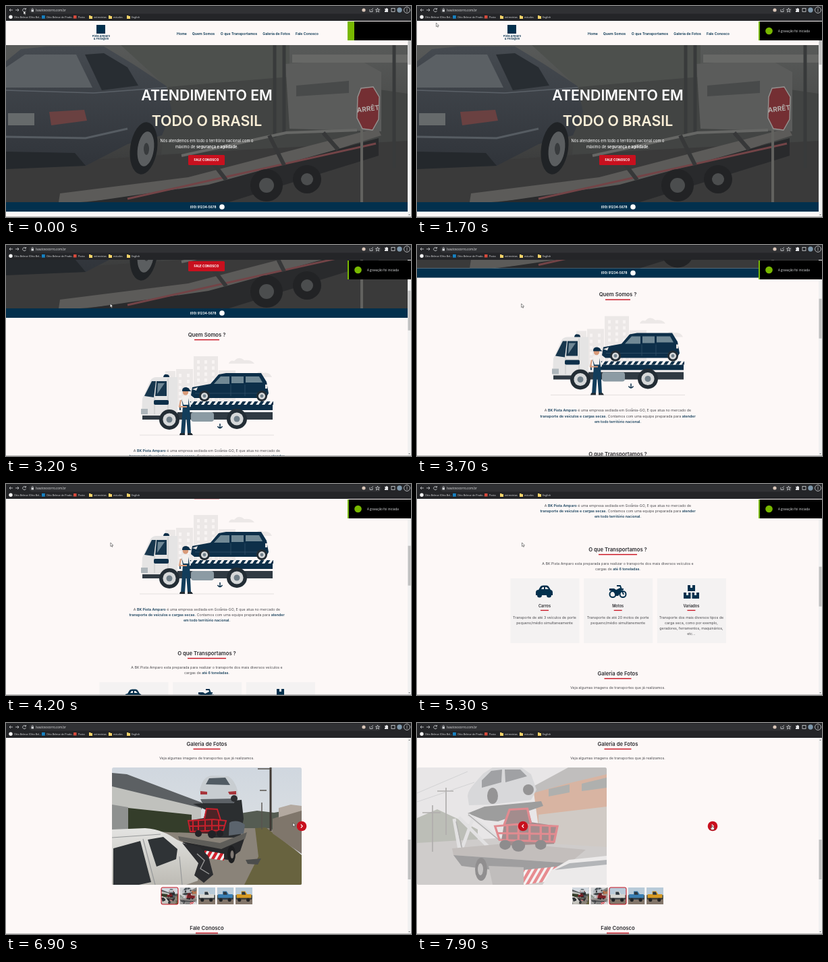
Animation, 600 px wide and 313 px high, one loop 8000 ms. Source, as an HTML page:

```html
<!DOCTYPE html>
<html lang="pt-BR">
<head>
<meta charset="utf-8">
<title>Pista Amparo</title>
<style>
  html, body { margin: 0; width: 100%; height: 100%; overflow: hidden; background: #fdf8f7; }
  svg { display: block; }
  #stage { width: 100vw; height: 100vh; }
  text { font-family: Inter, "Open Sans", sans-serif; font-size: 5.3px; fill: #4b4b4f; }
  .mid text { text-anchor: middle; }
  .nav text { font-weight: 600; font-size: 5.2px; fill: #02304d; }
  .nav .logo { font-size: 4.1px; }
  .hero text { font-weight: 600; font-size: 21.3px; fill: #fff; }
  .hero .lead { font-weight: 400; font-size: 5.7px; }
  .hero .btn { font-weight: 700; font-size: 4.7px; }
  .body .title { font-weight: 600; font-size: 7.7px; fill: #2c2c30; }
  .body .name { font-weight: 600; font-size: 5.6px; fill: #2c2c30; }
  .chrome text { font-family: "Open Sans", sans-serif; font-size: 4.5px; fill: #e4e5e7; }
  .chrome .marks text { font-size: 3.7px; }
  tspan { font-weight: 600; }
  .body tspan { fill: #17405c; }
  .red { fill: #c8101e; }
  .navy { fill: #02304d; }
  .line { fill: none; stroke: #d5d7da; stroke-width: .8; }
  .chevron { fill: none; stroke: #fff; stroke-width: 1.1; }
</style>
</head>
<body>
<svg id="stage" viewBox="0 0 600 313" preserveAspectRatio="none">
<defs>
  <linearGradient id="haze" x2="0" y2="1">
    <stop stop-color="#585a59"/><stop offset=".5" stop-color="#474847"/><stop offset="1" stop-color="#303132"/>
  </linearGradient>
  <linearGradient id="paint" x2="0" y2="1">
    <stop stop-color="#454a50"/><stop offset="1" stop-color="#30343a"/>
  </linearGradient>
  <linearGradient id="sky" x2="0" y2="1">
    <stop stop-color="#d0d7df"/><stop offset="1" stop-color="#e3e5e5"/>
  </linearGradient>
  <linearGradient id="shell" x2="0" y2="1">
    <stop stop-color="#e4e4e2"/><stop offset="1" stop-color="#bdbbb4"/>
  </linearGradient>
  <pattern id="hatch" width="9" height="6" patternUnits="userSpaceOnUse" patternTransform="skewX(-35)">
    <rect width="9" height="6" fill="#f3f1f0"/><rect width="5" height="6" fill="#0d2f49"/>
  </pattern>
  <pattern id="warn" width="9" height="14" patternUnits="userSpaceOnUse" patternTransform="skewX(-30)">
    <rect width="9" height="14" fill="#eee"/><rect width="5" height="14" fill="#d3222c"/>
  </pattern>
  <clipPath id="frame"><rect width="281" height="174" rx="2.5"/></clipPath>
  <clipPath id="heroBox"><rect y="58" width="595" height="233"/></clipPath>

  <g id="trike">
    <path d="M9 16 14 1 30 0 34 14 57 18 54 36 6 38Z" fill="#4c2326"/>
    <path d="M9 17 14 1 30 0 33 15M1 18 20 16 57 18 54 34 5 32ZM3 25 56 26M12 17V33M22 16V33M32 16V34M42 17V34M50 18V34" fill="none" stroke="#c7202c" stroke-width="2"/>
    <g fill="#222226"><circle cx="10" cy="37" r="5"/><circle cx="22" cy="38" r="6"/><circle cx="42" cy="37" r="5"/></g>
  </g>

  <g id="photo0" clip-path="url(#frame)">
    <rect width="281" height="174" fill="url(#sky)"/>
    <path d="M190 68 215 64 240 67 281 60V110H185Z" fill="#555c52"/>
    <path d="M0 98 130 90 235 90 281 130V174H0Z" fill="#8a8379"/>
    <path d="M0 8 22 10 133 52V62L0 30Z" fill="#5c6063"/>
    <path d="M0 28 132 60V96L0 96Z" fill="#c0c1bd"/>
    <path d="M24 60 118 70V97L24 94Z" fill="#343d2a"/>
    <path d="M0 55 24 59V96H0Z" fill="#8f9190"/>
    <path d="M212 90 228 89 281 130V174H196L217 132Z" fill="#68633f"/>
    <path d="M238 76 281 62V128L238 98Z" fill="#7f766b"/>
    <path d="M247 60 265 55 281 57V64L247 74Z" fill="#b3a9a0"/>
    <path d="M235 0V94" stroke="#3f3833" stroke-width="3"/>
    <path d="M222 52V92M216 2H236M219 34H229" stroke="#59544f" stroke-width="1.4"/>
    <path d="M120 54 150 52 192 48 195 76 190 104 150 104 146 66Z" fill="#2b2e30"/>
    <path d="M130 33C134 18 139 12 150 12L172 13C180 17 187 30 187 43L180 53H133Z" fill="#c8cdd1"/>
    <path d="M139 25 144 16 168 15 175 26Z" fill="#515b63"/>
    <path d="M131 35 141 36V40H131ZM172 36 184 35V40H174Z" fill="#a7343a"/>
    <path d="M131 47 185 46 180 53H134Z" fill="#5c6166"/>
    <circle cx="181" cy="46" r="5" fill="#2c2e31"/>
    <path d="M174 82C180 78 190 79 197 85L195 98 173 101Z" fill="#5b646d"/>
    <path d="M98 102 160 112 200 96 197 106 162 122 100 108Z" fill="#5e5d59"/>
    <path d="M105 110 162 121 196 106 190 124 172 137 106 128Z" fill="#28292b"/>
    <path d="M137 123 166 128V138L137 134Z" fill="url(#warn)"/>
    <ellipse cx="177" cy="129" rx="6" ry="13" fill="#1d1e20"/>
    <ellipse cx="178" cy="129" rx="2.5" ry="6" fill="#817a74"/>
    <use href="#trike" transform="translate(170 61) scale(-1 1)"/>
    <path d="M198 137 221 135 216 144 201 143Z" fill="#4c4d4c"/>
    <path d="M0 92 49 90C70 91 84 99 96 107L122 119 132 140 127 168 110 174H0Z" fill="url(#shell)"/>
    <path d="M2 120 42 109 58 170 40 174H2ZM53 107 76 103 97 121 95 136 66 147Z" fill="#2f3336"/>
    <path d="M46 106 64 174M0 104 72 99M100 132 104 174" fill="none" stroke="#97999a" stroke-width="1.2"/>
    <path d="M104 112 130 118 143 132 150 159 136 171 122 160 128 142Z" fill="#2c2d30"/>
    <path d="M126 128 137 138 131 150 144 158" fill="none" stroke="#999" stroke-width="1.4"/>
  </g>

  <g id="photo1" clip-path="url(#frame)">
    <rect width="281" height="174" fill="#d4d6d8"/>
    <path d="M0 75 30 62 60 76 90 92V125H0Z" fill="#7d8578"/>
    <path d="M0 112 281 95V174H0Z" fill="#a3a2a1"/>
    <path d="M172 30 225 14 281 4V72L180 88Z" fill="#b5734f"/>
    <path d="M165 32 224 0H281V10L222 24 172 38Z" fill="#858585"/>
    <path d="M195 32 226 25V37L195 43ZM244 24 281 15V30L244 35Z" fill="#646b68"/>
    <path d="M180 70 281 58V118L180 112Z" fill="#a49e95"/>
    <path d="M23 56V125M43 30V100M8 67H35M30 35H54" stroke="#656565" stroke-width="1.7"/>
    <path d="M0 38 75 6M0 51 85 22" stroke="#8c9197" stroke-width=".6"/>
    <path d="M75 68 100 58 184 50 187 57 120 80 100 78Z" fill="#3f4446"/>
    <path d="M75 42C76 31 90 19 98 9L112 0H155L169 10 177 33 169 48 110 55 77 56Z" fill="#b4b9be"/>
    <path d="M96 19 110 5 126 3 125 22 96 30ZM130 3 153 3 163 13 131 22Z" fill="#454d53"/>
    <ellipse cx="112" cy="42" rx="8" ry="12" fill="#303336"/><circle cx="165" cy="33" r="8" fill="#303336"/>
    <path d="M55 76 64 128M62 74 110 122M84 72 66 122M76 70 120 104" stroke="#c9ccce" stroke-width="5"/>
    <path d="M76 70 122 108M58 80 68 126" stroke="#66696b" stroke-width="1.5"/>
    <path d="M52 120 140 112 250 122 226 142 54 130Z" fill="#8a8582"/>
    <path d="M54 130 226 142 222 150 160 158 66 146Z" fill="#44474a"/>
    <path d="M106 146 158 148V174H112Z" fill="#858483"/>
    <ellipse cx="95" cy="151" rx="9" ry="17" fill="#252729"/>
    <ellipse cx="94" cy="151" rx="4" ry="9" fill="#8d8e8e"/>
    <use href="#trike" transform="translate(114 61) scale(1.65 1.45)"/>
    <path d="M158 152 225 145 222 165 158 174Z" fill="url(#warn)"/>
    <path d="M186 174 200 152 225 137 281 131V174Z" fill="#dcdedf"/>
    <path d="M204 152 226 142 281 137V144Z" fill="#6c757a"/>
  </g>

  <g id="rig">
    <rect width="174" height="174" fill="#b9cbd9"/><path d="M0 118H174V174H0Z" fill="#83766a"/>
    <path d="M0 78H174V118H0Z" fill="#56605c"/>
    <path d="M12 70H60V38H100L120 70H162V126H12Z" fill="var(--rig)"/>
    <path d="M65 46H96L107 74H65Z" fill="#2c3740"/>
    <path d="M8 108H167V124H8Z" fill="#35383c"/>
    <g fill="#222426"><circle cx="40" cy="128" r="18"/><circle cx="130" cy="128" r="18"/></g>
  </g>
</defs>

<g id="page">
  <rect y="22" width="600" height="1040" fill="#fdf8f7"/>

  <g class="nav mid">
    <rect class="navy" x="134" y="28" width="13" height="13"/>
    <text class="logo" x="141" y="46">Pista Amparo</text>
    <text class="logo" x="141" y="50.4">&amp; Fretagem</text>
    <text x="260.5" y="42.6">Home</text><text x="292.5" y="42.6">Quem Somos</text>
    <text x="345" y="42.6">O que Transportamos</text><text x="400.5" y="42.6">Galeria de Fotos</text>
    <text x="446" y="42.6">Fale Conosco</text>
  </g>

  <g clip-path="url(#heroBox)">
    <rect y="58" width="595" height="233" fill="url(#haze)"/>
    <path d="M170 58H420V110L240 122Z" fill="#4d504d"/>
    <path d="M240 120 420 105 595 130V205L230 220Z" fill="#424443"/>
    <path d="M0 218 130 228 320 215 595 200V291H0Z" fill="#3a3a3a"/>
    <path d="M414 86 520 78 556 98V186L420 182Z" fill="#5b5c5b"/>
    <path d="M424 72H595V84H424Z" fill="#676866"/>
    <path d="M430 118 508 111V129L430 134Z" fill="#484a4a"/>
    <path d="M398 58V195M412 58V190M575 58V240" stroke="#383a3b" stroke-width="5"/>
    <path d="M0 82 22 64 60 60H145L188 86 238 119 246 157 231 192 180 205 118 237 0 240Z" fill="url(#paint)"/>
    <path d="M0 91 28 72H104L128 121H0Z" fill="#5b6064"/>
    <path d="M117 72 145 70 180 91 196 118 142 125Z" fill="#282d32"/>
    <path d="M0 125 130 129 238 121" fill="none" stroke="#5b6168" stroke-width="1.5"/>
    <path d="M0 194 118 196 180 182" fill="none" stroke="#565c62" stroke-width="3"/>
    <path d="M64 157 116 154 120 170 67 177Z" fill="#6a4141"/>
    <path d="M3 159H42V177H3Z" fill="#666a6b"/>
    <path d="M0 216 102 218 118 237 0 242Z" fill="#24282c"/>
    <ellipse cx="204" cy="211" rx="20" ry="39" fill="#202326" transform="rotate(8 204 211)"/>
    <ellipse cx="207" cy="212" rx="12" ry="26" fill="#5b5e60" transform="rotate(8 207 212)"/>
    <ellipse cx="208" cy="212" rx="4" ry="9" fill="#383b3d"/>
    <path d="M80 278 270 254 550 181 556 192 295 274 110 291H78Z" fill="#5c5b59"/>
    <path d="M120 291 300 265 552 196V222L330 291Z" fill="#292a2c"/>
    <path d="M180 286 548 204" stroke="#734447" stroke-width="3"/>
    <path d="M260 222 415 188 520 184" fill="none" stroke="#666765" stroke-width="4"/>
    <path d="M300 224 326 258M390 192 412 236M470 188 492 213" stroke="#373839" stroke-width="6"/>
    <g fill="#222325"><circle cx="386" cy="266" r="24"/><circle cx="446" cy="257" r="21"/></g>
    <g fill="#4b4d4e"><circle cx="386" cy="266" r="11"/><circle cx="446" cy="257" r="9"/></g>
    <path d="M527 174V291" stroke="#62625f" stroke-width="4"/>
    <path d="M526 122 544 120 553 135 552 168 543 184 528 182 520 166 521 135Z" fill="#742f33" stroke="#969290" stroke-width="1.4"/>
    <text x="536.5" y="156" text-anchor="middle" transform="rotate(-7 537 153)" style="font-size:10px;font-weight:700;fill:#b2adaa">ARRÊT</text>
  </g>
  <g class="hero mid">
    <text x="297.5" y="140">ATENDIMENTO EM</text>
    <text x="297.5" y="177.5" style="fill:#fbefd8">TODO O BRASIL</text>
    <text class="lead" x="297.5" y="202.4">Nós atendemos em todo o território nacional com o</text>
    <text class="lead" x="297.5" y="210.8">máximo de <tspan>segurança e agilidade.</tspan></text>
    <rect class="red" x="270" y="221" width="54" height="15" rx="1.5"/>
    <text class="btn" x="297" y="230.2">FALE CONOSCO</text>
    <rect class="navy" y="291" width="595" height="14"/>
    <text class="btn" x="292" y="299.8">(00) 91234-5678</text>
    <circle cx="320" cy="298" r="3.8" fill="#fff"/>
  </g>

  <g transform="translate(0 197)">
    <g fill="#ece8e7">
      <path d="M236 187H251V240H236ZM252 184H277V240H252ZM278 165H314V240H278ZM315 186H340V240H315Z"/>
      <path d="M330 176Q332 170 338 172Q345 164 353 171Q364 170 368 176ZM370 193Q374 185 381 190Q390 188 394 196H370Z"/>
    </g>
    <path d="M285 171V230M296 171V230M307 171V230M258 191V230M270 191V230M321 193V230M333 193V230" stroke="#f8f4f3" stroke-width="4" stroke-dasharray="5 4"/>
    <path d="M198 282H397" stroke="#e4e0df"/>
    <rect x="202" y="248" width="193" height="11" fill="#303a43"/>
    <path d="M201 251 202 228 214 201Q217 196 223 196H254V253H202Z" fill="#e5e4e4"/>
    <path d="M205 224 216 202H222L219 226ZM223 202H238V224H221Z" fill="#17364d"/>
    <path d="M225 205H235L224 221Z" fill="#6f8795"/>
    <path d="M240 198V251M220 226V251" stroke="#bbb" stroke-width=".8"/>
    <rect x="219" y="230" width="22" height="7" rx="2" fill="#0d2f49"/>
    <path d="M233 196Q234 191 238 192Q242 192 242 196Z" fill="#0d2f49"/>
    <path d="M200 243H210V251H200Z" fill="#aeb6bb"/>
    <rect x="257" y="237" width="138" height="8" fill="#0d2f49"/>
    <rect x="271" y="232" width="125" height="5" fill="url(#hatch)"/>
    <rect x="274" y="248" width="34" height="14" rx="4" fill="#8c9ba4"/>
    <path d="M274 223 276 211 303 206 315 192 326 190H378L386 203 389 220 385 227H279Z" fill="#0d2f49"/>
    <path d="M308 206 318 195H331V206ZM334 195H352V205H334ZM355 195H375L380 204H355Z" fill="#718995"/>
    <path d="M276 214 284 211 282 216ZM384 207H387V213H384Z" fill="#e6e3e2"/>
    <path d="M280 220H387M333 207V224M354 207V224" stroke="#315068" stroke-width=".8"/>
    <g id="wheels"></g>
    <path d="M261 224H271L274 239 266 246H259L258 234Z" fill="#f3f0ee"/>
    <path d="M260 228 262 239 259 280H265L267 252 269 280H274L272 239 270 227V237H263Z" fill="#123d5b"/>
    <circle cx="266" cy="218.5" r="4.2" fill="#d99b79"/>
    <path d="M261 216Q261 211 267 211Q272 212 272 215L275 217H261Z" fill="#0d2f49"/>
    <path d="M259 230 257 240 268 240" fill="none" stroke="#d99b79" stroke-width="2"/>
    <path d="M258 279H265V282H257ZM269 279H275L277 282H269Z" fill="#222b32"/>
    <path d="M317 265V271M313.5 269Q317 274 320.5 269" fill="none" stroke="#0d2f49" stroke-width="1.5"/>
  </g>

  <g class="body mid">
    <text x="297.5" y="503.8">A <tspan>BK Pista Amparo</tspan> é uma empresa sediada em Goiânia-GO, E que atua no mercado de</text>
    <text x="297.5" y="512"><tspan>transporte de veículos e cargas secas.</tspan> Contamos com uma equipe preparada para <tspan>atender</tspan></text>
    <text x="297.5" y="520"><tspan>em todo território nacional.</tspan></text>
    <text x="297.5" y="589.8">A BK Pista Amparo esta preparada para realizar o transporte dos mais diversos veículos e</text>
    <text x="297.5" y="597.9">cargas de <tspan>até 6 toneladas.</tspan></text>
    <g id="cards"></g>
    <g class="navy">
      <path d="M176 631Q176 627 180 627L183 622Q184 620.5 187 620.5H192Q194 620.5 195 622L198 627Q201 627.5 201 631V635H199A3.5 3.5 0 0 1 192 635H185A3.5 3.5 0 0 1 178 635H176Z"/>
      <path d="M184 626 186 623H188V626ZM190 623H192L195 626H190Z" fill="#f4f2f2"/>
      <circle cx="181.5" cy="635.5" r="2.5"/><circle cx="195.5" cy="635.5" r="2.5"/>
      <g fill="none" stroke="#02304d" stroke-width="2"><circle cx="290" cy="633.5" r="4.5"/><circle cx="305" cy="633.5" r="4.5"/><path d="M296 621H301L306 634M300 626H306"/></g>
      <path d="M285 625H292L295 627 301 624 303 629 298 636H293Q294 629 285 628Z"/>
      <path d="M401 620H412V629H401ZM395 631H405.5V640H395ZM407.5 631H418V640H407.5Z"/>
      <path d="M405 620H408V624H405ZM399 631H402V635H399ZM411 631H414V635H411Z" fill="#f4f2f2"/>
    </g>
    <text x="297.5" y="773.8">Veja algumas imagens de transportes que já realizamos.</text>
    <g id="titles"></g>
  </g>

  <g id="slide"><use id="photo"/></g>
  <g id="thumbs"></g>
  <g id="prev"><circle class="red" cx="157" cy="873" r="7.3"/><path class="chevron" d="M158.2 870.5 155.7 873 158.2 875.5"/></g>
  <circle class="red" cx="438" cy="873" r="7.3"/><path class="chevron" d="M436.8 870.5 439.3 873 436.8 875.5"/>
</g>

<rect x="595" y="22" width="5" height="291" fill="#f1f1f1"/>
<path d="M596.3 26 597.5 24.5 598.7 26ZM596.3 309 597.5 310.5 598.7 309Z" fill="#666"/>
<rect id="thumb" x="595.5" width="4" height="59" fill="#c1c1c1"/>
<path d="M0 312.7H600" stroke="#777" stroke-width=".6"/>

<g class="chrome">
  <rect width="600" height="22" fill="#242528"/>
  <rect x="34" y="1" width="522" height="10.5" rx="5.2" fill="#303134"/>
  <path class="line" d="M10 6H5M7 4 5 6 7 8M14 6H19M17 4 19 6 17 8M29 4.5A2.5 2.5 0 1 0 29.5 7M29.5 3V5H27.5"/>
  <path d="M37.5 5.5H41V8.5H37.5Z" fill="#d5d7da"/><path class="line" d="M38.2 5.5V4.4Q39.2 2.8 40.3 4.4V5.5"/>
  <text x="44" y="7.7">lsautosocorro.com.br</text>
  <circle cx="530" cy="6" r="2.6" fill="#d9c6b8"/>
  <path class="line" d="M539 5V8.5H543V6M541 6 544 3.5M550.5 3 551.3 5.3H553.5L551.8 6.7 552.5 9 550.5 7.6 548.5 9 549.2 6.7 547.5 5.3H549.7Z"/>
  <path d="M561 4H563A1 1 0 0 1 565 4H566V9H561V7A1 1 0 0 0 561 5Z" fill="#e4e5e7"/>
  <rect class="line" x="571" y="3.5" width="5" height="5"/>
  <circle cx="583" cy="6" r="3.7" fill="#7d96a9"/>
  <circle class="line" cx="594" cy="6" r="4.5"/><path d="M594 3.8V8.5" stroke="#eee" stroke-dasharray="1 .8"/>
  <g class="marks">
    <circle cx="7" cy="16.3" r="2.7" fill="#f2f2f2"/><text x="12" y="17.6">Otto Belmar (Otto Bel...</text>
    <rect x="53" y="13.9" width="4.8" height="4.8" fill="#1681c2"/><text x="60" y="17.6">Otto Belmar de Prado...</text>
    <rect x="100" y="14" width="4.5" height="4.5" fill="#d84a3c"/><text x="107" y="17.6">Posta</text>
    <path d="M123 14H125L126 15H128V19H123ZM152 14H154L155 15H157V19H152ZM179 14H181L182 15H184V19H179Z" fill="#f5d268"/>
    <text x="130" y="17.6">entrevistas</text><text x="159" y="17.6">estudos</text><text x="186" y="17.6">English</text>
  </g>
  <g id="toast">
    <rect x="506" y="23" width="94" height="28" fill="#78b800"/>
    <rect id="cover" y="23" width="92" height="28"/>
    <g id="notice"><circle cx="521.5" cy="37" r="5.3" fill="#78b800"/><text x="535" y="38.9">A gravação foi iniciada</text></g>
  </g>
</g>

<g id="cursor" stroke="#222" stroke-width=".5" fill="#fff">
  <path id="arrow" d="M0 0V5.6L1.3 4.5 2.2 6.4 3.1 6 2.2 4.1H4Z"/>
  <path id="hand" d="M-.6 0Q0-.8.6 0V2.2L3 2.8Q3.6 3 3.4 4L2.8 6.6H-.6L-2.4 4Q-1.7 3-.6 4Z"/>
</g>
</svg>

<script>
const LOOP = 8000, STEP = 100;
const $ = id => document.getElementById(id);
const fill = (id, items, markup) => { $(id).innerHTML = items.map(markup).join(''); };
const show = (el, on) => { el.style.display = on ? '' : 'none'; };
const move = (id, x, y) => $(id).setAttribute('transform', `translate(${x} ${y})`);

fill('wheels', [[242, 259, 15], [342, 258, 15], [294, 224, 8], [379, 224, 8]], ([x, y, r]) =>
  `<circle cx="${x}" cy="${y}" r="${r}" fill="#232d35"/><circle cx="${x}" cy="${y}" r="${r * .64}" fill="#d6d8d9"/>
   <circle cx="${x}" cy="${y}" r="${r * .3}" fill="#71808a"/>`);

fill('titles', [
  ['Quem Somos ?', 330, 37], ['O que Transportamos ?', 567, 57],
  ['Galeria de Fotos', 751, 40], ['Fale Conosco', 1024, 33],
], ([label, y, w]) => `<text class="title" x="297.5" y="${y + 2.7}">${label}</text>
  <rect class="red" x="${297.5 - w / 2}" y="${y + 6.9}" width="${w}" height="1.4"/>`);

fill('cards', [
  ['Carros', ['Transporte de até 3 veículos de porte', 'pequeno/médio simultaneamente']],
  ['Motos', ['Transporte de até 20 motos de porte', 'pequeno/médio simultanemente']],
  ['Variados', ['Transporte dos mais diversos tipos de', 'carga seca, como por exemplo,',
    'geradores, ferramentos, maquinários,', 'etc...']],
], ([name, lines], i) => {
  const x = 189 + i * 108.7;
  return `<rect x="${x - 50.5}" y="610" width="102" height="96" fill="#f4f2f2"/>
    <text class="name" x="${x}" y="653">${name}</text>
    <rect class="red" x="${x - 6}" y="656.8" width="12" height="1.3"/>` +
    lines.map((line, n) => `<text x="${x}" y="${669.8 + n * 7.9}">${line}</text>`).join('');
});

fill('thumbs', [['photo0'], ['photo1'], ['rig', '#d6d6d2'], ['rig', '#3a7fb4'], ['rig', '#d89a22']], ([art, color], i) => {
  const x = 230 + i * 27.5;
  return `<svg x="${x}" y="964" width="25" height="25" viewBox="${color ? 0 : 53} 0 174 174">
    <use href="#${art}" style="--rig:${color}"/></svg>
    <rect class="ring" x="${x}" y="964" width="25" height="25" rx="2" fill="none" stroke="#c8101e"/>`;
});
const rings = [...document.querySelectorAll('.ring')];

// Each row is [time, ...values]; values run linearly between rows.
const SCROLL = [[2200, 0], [2700, 72], [3200, 197], [4200, 316], [5300, 470], [6900, 720]];
const CURSOR = [[0, 26, 7], [800, 26, 7], [1200, 6, 4], [1600, 7, 12], [2100, 114, 77], [2200, 114, 77],
  [2600, 154, 87], [5300, 155.5, 87], [6300, 156, 88], [6900, 425, 148], [7000, 436, 152], [7900, 437, 152]];
const LEAVE = [[6900, 0, 1], [7300, 312, 0]];
const ENTER = [[7300, 312, 0], [7400, 160, .5], [7500, 40, .87], [7600, 0, 1], [7700, -20, .93], [7900, -157, .5]];
const COVER = [[0, 516], [200, 508]];
const NOTICE = [[200, 0], [500, 1]];
const TOAST = [[5900, 0], [6300, 94]];

function at(rows, t) {
  const next = rows.findIndex(row => row[0] > t);
  if (next === 0) return rows[0].slice(1);
  if (next < 0) return rows[rows.length - 1].slice(1);
  const a = rows[next - 1], b = rows[next], p = (t - a[0]) / (b[0] - a[0]);
  return a.slice(1).map((v, i) => v + (b[i + 1] - v) * p);
}

function draw(now) {
  const t = Math.floor(now % LOOP / STEP) * STEP;
  const [scroll] = at(SCROLL, t);
  move('page', 0, -scroll);
  $('thumb').setAttribute('y', 28 + scroll * .2014);

  const first = t < 7300;
  const [shift, alpha] = at(first ? LEAVE : ENTER, t);
  $('photo').setAttribute('href', first ? '#photo0' : '#photo1');
  $('slide').setAttribute('opacity', alpha);
  move('slide', 157 + shift, 786);

  const active = t < 7000 ? 0 : t < 7700 ? 1 : 2;
  rings.forEach((ring, i) => show(ring, i === active));
  show($('prev'), active > 0);

  $('cover').setAttribute('x', at(COVER, t)[0]);
  $('notice').setAttribute('opacity', at(NOTICE, t)[0]);
  move('toast', at(TOAST, t)[0], 0);

  move('cursor', ...at(CURSOR, t));
  show($('arrow'), active === 0);
  show($('hand'), active > 0);
  requestAnimationFrame(draw);
}
draw(performance.now());
</script>
</body>
</html>
```
